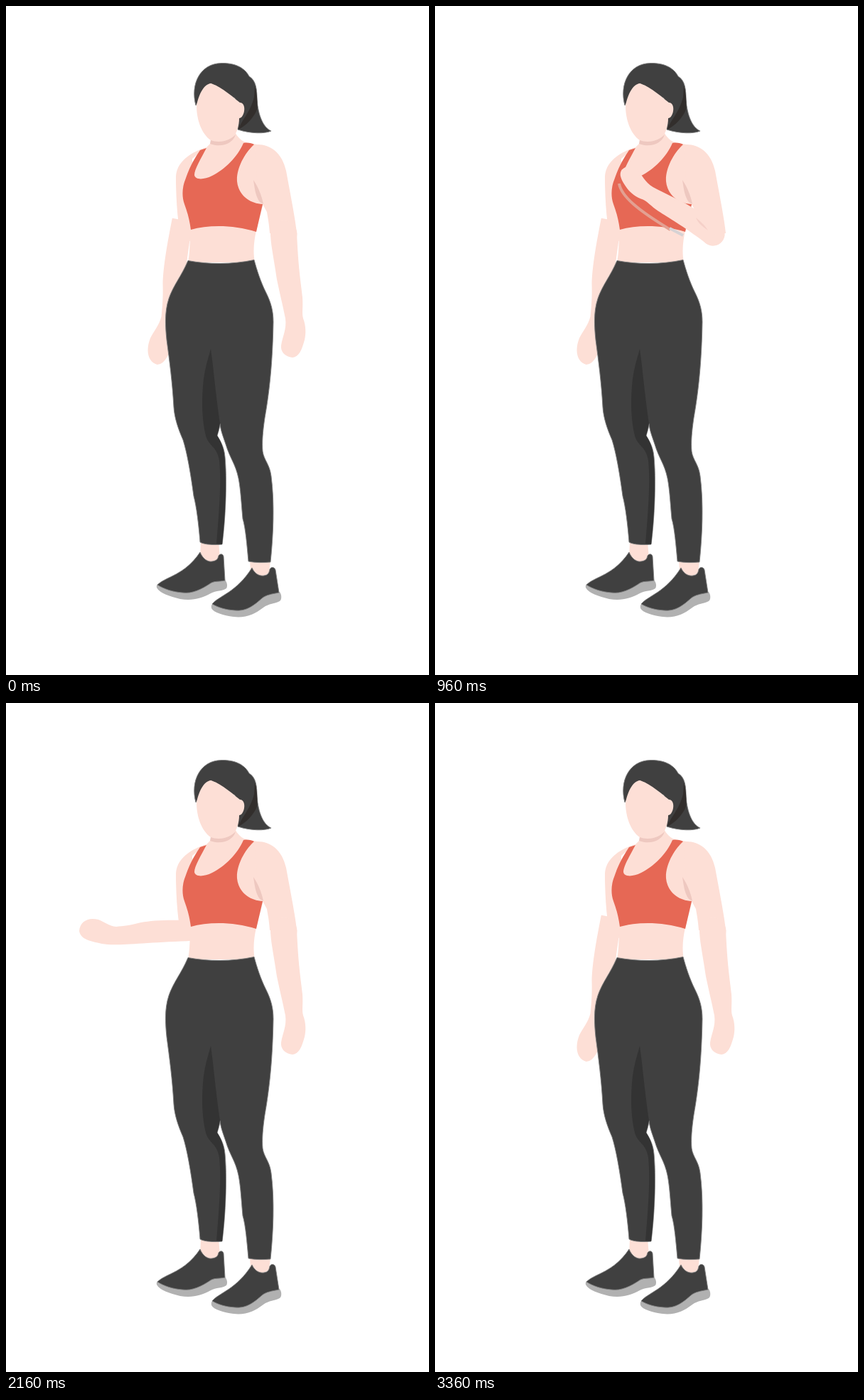
These frames come from a looping animation (595x942 px, 3480 ms). An HTML page without scripts:

```html
<!DOCTYPE html>
<html lang="en">
<head>
<meta charset="utf-8">
<title>Alternating arm curls</title>
<style>
html, body { margin: 0; width: 100%; height: 100%; overflow: hidden; background: #fff; }
svg { display: block; width: 100vw; height: 100vh; }
.skin { fill: #fddfd6; }
.dark { fill: #404040; stroke: #7d7d7d; stroke-width: .9; }
.shade { fill: #333; }
.sole { fill: #b1b1b1; }
.bra { fill: #e66855; }
.crease { fill: #eec8c0; }

/* 29 ticks of 120 ms: an arm curls for 7, lowers for 7, then rests while the other works */
.curl, .lean, .shift, .fold, .cast { animation: curl 3480ms steps(2) infinite; }

/* forearm angles from hanging to fully bent, with lengths for the first three */
.near {
  --a0: 0deg; --a1: 32deg; --a2: 82deg; --a3: 129deg; --a4: 143deg;
  --s0: 1; --s1: .9; --s2: .9;
  transform-origin: 391px 321px;
}
.far {
  --a0: -80deg; --a1: -49deg; --a2: 0deg; --a3: 46deg; --a4: 55deg;
  --s0: 1.3 1; --s1: 1.12 1; --s2: 1 1;
  transform-origin: 246px 322px;
  animation-delay: -1800ms;
}
.lean { animation-name: lean; transform-origin: 365px 215px; }
.shift { animation-name: shift; }
.fold { animation-name: fold; animation-timing-function: step-end; opacity: 0; }
.cast { animation-name: cast; animation-timing-function: step-end; opacity: 0; }

@keyframes curl {
  0%, 48.27%, 100% { rotate: var(--a0); scale: var(--s0); }
  6.89%, 41.37% { rotate: var(--a1); scale: var(--s1); }
  13.79%, 34.48% { rotate: var(--a2); scale: var(--s2); }
  20.68% { rotate: var(--a3); scale: var(--s2); animation-timing-function: step-end; }
  24.13% { rotate: var(--a4); scale: var(--s2); animation-timing-function: step-end; }
  27.58% { rotate: var(--a3); scale: var(--s2); }
}
/* the elbow swings out halfway through the curl */
@keyframes lean {
  0%, 6.89%, 20.68%, 27.58%, 41.37%, 100% { rotate: 0deg; scale: 1 1; }
  13.79%, 34.48% { rotate: -10deg; scale: 1 .87; }
}
@keyframes shift {
  0%, 6.89%, 20.68%, 27.58%, 41.37%, 100% { translate: 0 0; }
  13.79%, 34.48% { translate: 9px -19px; }
}
@keyframes fold {
  0%, 17.24%, 37.93%, 100% { opacity: 0; }
  13.79%, 34.48% { opacity: 1; }
}
@keyframes cast {
  0%, 24.13%, 31.03%, 100% { opacity: 0; }
  20.68%, 27.58% { opacity: 1; }
}
</style>
</head>
<body>
<svg viewBox="0 0 595 942" preserveAspectRatio="none">
  <!-- far arm -->
  <g class="skin">
    <path d="M282,199C262,205 240,218 239,240C239,262 240,285 243,308L262,336V215Z"/>
    <g class="curl far">
      <circle cx="248" cy="321" r="14"/>
      <path d="M262,306C225,305 205,306 190,309C175,313 165,314 155,315C145,314 138,308 130,305C115,301 104,308 103,321C105,333 118,335 135,339C155,343 190,337 262,335Z"/>
    </g>
  </g>

  <!-- feet -->
  <path class="skin" d="M274,754H299L301,778C295,785 280,784 273,779ZM343,781H372L370,798C362,805 350,804 344,796Z"/>
  <path class="sole" d="M212,819C211,814 214,813 217,814L280,808L308,808C311,811 312,817 310,820C305,824 295,823 288,827C275,834 262,838 245,835C230,831 216,827 212,819Z"/>
  <path class="sole" d="M289,848C288,842 291,841 294,841L355,826L385,825C388,829 388,836 385,838C378,842 370,841 362,847C350,856 338,862 320,860C306,858 292,854 289,848Z"/>
  <path class="dark" d="M273,769C277,779 284,783 290,782C296,781 298,779 299,774C301,771 305,771 306,775L308,809C298,811 292,809 286,814C275,821 262,828 248,826C235,825 222,821 213,815C225,803 251,802 273,769Z"/>
  <path class="dark" d="M346,791C350,800 357,803 363,802C369,801 370,798 371,793C373,789 378,790 379,794L384,826C374,828 366,829 360,834C350,843 338,853 322,851C308,850 299,847 290,842C300,830 324,826 346,791Z"/>

  <!-- torso and head -->
  <path class="skin" d="M288,185V193L280,201C260,215 250,240 250,270L260,315C258,335 259,345 256,361H350C347,345 349,330 352,316L362,278L380,230C375,205 365,195 345,194C335,193 327,187 323,179Z"/>
  <path class="crease" d="M288,188C300,193 314,190 323,181C319,194 303,200 287,194Z"/>
  <path class="dark" d="M267,140C259,110 273,81 303,80.500C325,80 337,89 342,99C352,105 353,118 353,132C355,155 362,171 373,176C364,180 345,180 326,174L322,130L288,109Z"/>
  <path d="M350,112C354,125 354,140 353,146C348,158 338,168 327,174C329,164 344,150 349,128Z" fill="#322e2c"/>
  <path class="skin" d="M288,109C300,112 318,127 329,136C334,136 336,142 335,148C334,154 331,158 328,158C328,168 325,178 321,182C313,191 298,193 288,189C275,180 268,160 268,140C272,122 279,110 288,109Z"/>
  <path class="bra" d="M273,203L282,200C274,215 265,230 265,238C266,245 278,245 290,239C308,230 326,212 334,193C340,192 346,193 349,195C334,209 324,230 325,247C327,266 342,278 361,279L352,318C320,308 285,308 260,315C258,300 255,290 251,279C247,268 248,255 252,245C258,227 265,215 273,203Z"/>

  <!-- leggings -->
  <path class="dark" d="M256,358.500C285,364 318,364 349,357.500C353,372 358,388 366,404C373,418 376,430 376,445C375,500 371,540 364,580C361,600 360,615 361,627C363,640 371,645 373,662C378,700 376,745 372,783C362,784 350,784 341,782C339,760 337,735 333,722C331,700 330,680 327,665C323,645 315,637 309,617C305,605 302,598 301,588C300,597 298,601 297,605C302,613 307,622 308,635C311,665 309,720 304,758C295,759 280,759 273,755C271,730 268,705 264,690C260,660 255,630 249,611C242,595 237,580 236,565C234,530 230,500 226,470C224,450 223,430 229,412C236,392 246,382 256,358.500Z"/>
  <path class="shade" d="M288,483C292,510 294,540 301,588L297,605C305,617 308,628 308,650C310,690 308,720 304,758L296,757C300,710 303,670 300,640C297,620 285,620 281,605C276,585 275,560 277,535C279,510 285,495 288,483Z"/>

  <!-- near arm -->
  <g class="cast" fill="none" stroke-width="4">
    <path d="M259,250C262,268 285,287 331,315" stroke="#e3a092"/>
    <path d="M330,313L349,323" stroke="#d6d2d4"/>
  </g>
  <g class="skin">
    <path class="lean" d="M352,195C370,194 388,205 394,232C400,265 407,300 409,320H371C370,305 368,297 367,290L361,279C354,260 350,235 352,195Z"/>
    <g class="shift">
      <g class="curl near">
        <circle cx="391" cy="321" r="18.500"/>
        <path d="M409,318C411,370 415,390 417,410C418,425 416,432 418,440C422,450 422,462 420,470C416,485 412,494 403,495C392,494 386,486 387,478C389,465 395,455 393,440C389,420 384,400 381,385C376,350 372,335 372,318Z"/>
      </g>
    </g>
  </g>
  <path class="crease" d="M348,245C355,255 360,268 362,279L357,276C351,268 350,258 348,245Z"/>
  <g class="fold crease">
    <path d="M253,331C262,322 282,321 300,326C285,329 265,327 253,331Z"/>
    <path d="M257,363C272,366 284,364 297,359C315,351 335,345 349,340V344C335,350 315,356 297,363Z"/>
    <path d="M373,292C380,289 390,289 396,291C388,294 380,295 373,292Z" opacity=".5"/>
  </g>
  <path class="cast" d="M367,298C373,303 379,308 384,316C377,311 370,306 367,298Z" fill="#f5d0c8"/>
</svg>
</body>
</html>
```
